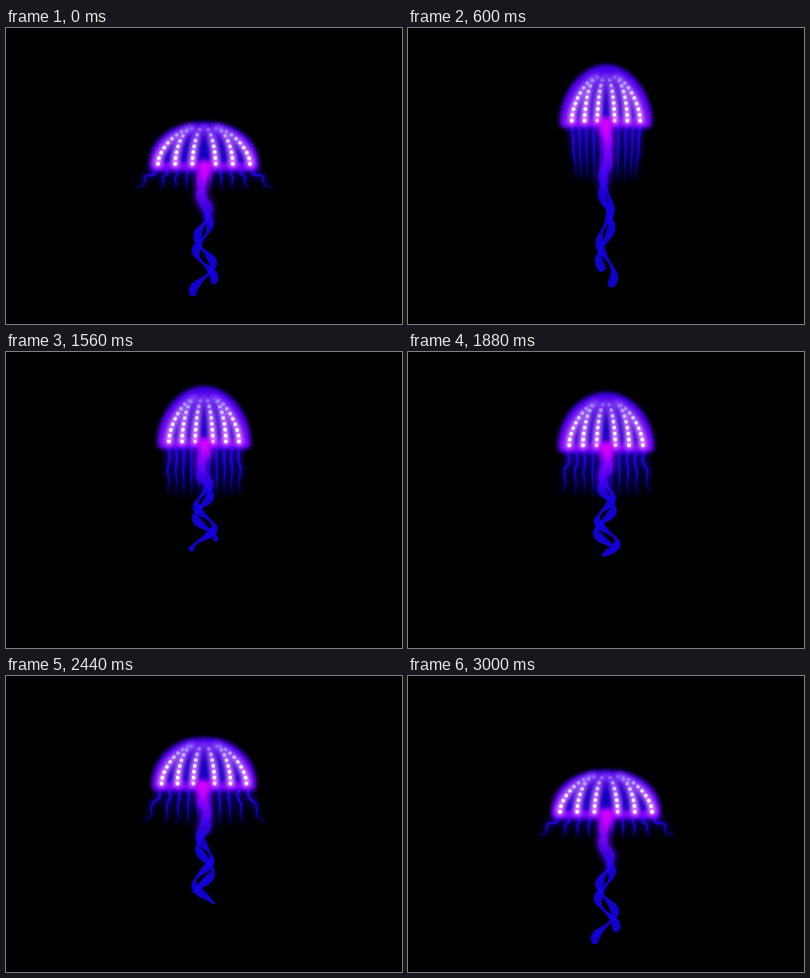
An HTML page with a canvas that plays this animation: 800 by 600 pixels, repeating every 3.04 s.

```html
<!DOCTYPE html>
<html>
<head>
<meta charset="utf-8">
<title>Jellyfish</title>
<style>
html, body { margin: 0; width: 100%; height: 100%; overflow: hidden; background: #000; }
canvas { display: block; }
</style>
</head>
<body>
<canvas id="stage" width="800" height="600"></canvas>
<script>
const ctx = document.getElementById('stage').getContext('2d');
const LOOP = 3040, SWIM = 3000, STEP = 40, CX = 400;
const WAVE = 0.42;

// Pose values at the key times, joined by monotone cubics
const TIMES = [0, 320, 560, 960, 1150, 1560, 2200, 2680, 3000];
const TRACKS = {
  base:   [275.5, 226, 190, 178, 176, 181.5, 201, 241, 275.5],
  shut:   [0, .85, .97, 1, .99, .91, .54, .09, 0],
  tip:    [537, 525, 520, 461, 428, 399, 435, 492, 537],
  sway:   [1.05, .92, .8, .73, .85, 1.15, 1.14, .98, 1.05],
  spread: [45, 3, -9, -11, -9, 2, 26, 40, 45],
  drop:   [45, 105, 118, 115, 112, 106, 88, 65, 45],
  wiggle: [5, 3, 1, 0, .5, 2, 4, 3.5, 5],
  node:   [.86, .98, 1.07, 1.21, 1.27, 1.365, 1.56, 1.72, 1.91]
};

function slope(v, i) {
  if (i === 0 || i === v.length - 1) return 0;
  const a = (v[i] - v[i - 1]) / (TIMES[i] - TIMES[i - 1]);
  const b = (v[i + 1] - v[i]) / (TIMES[i + 1] - TIMES[i]);
  return a * b <= 0 ? 0 : 2 * a * b / (a + b);
}

function sample(v, t) {
  let i = 0;
  while (i < TIMES.length - 2 && t > TIMES[i + 1]) i++;
  const d = TIMES[i + 1] - TIMES[i], s = (t - TIMES[i]) / d;
  const s2 = s * s, s3 = s2 * s;
  return v[i] * (2 * s3 - 3 * s2 + 1) + v[i + 1] * (3 * s2 - 2 * s3)
    + d * (slope(v, i) * (s3 - 2 * s2 + s) + slope(v, i + 1) * (s3 - s2));
}

function poseAt(t) {
  const p = { t: t / 1000 };
  for (const name in TRACKS) p[name] = sample(TRACKS[name], t);
  p.half = 93 - 24.5 * p.shut;
  p.len = p.tip - p.base;
  return p;
}

const blur = r => { ctx.filter = r ? `blur(${r}px)` : 'none'; };

function fade(y0, y1, ...stops) {
  const g = ctx.createLinearGradient(0, y0, 0, y1);
  stops.forEach(([at, color]) => g.addColorStop(at, color));
  return g;
}

// Closed outline around a centre line with a half width per point
function ribbon(points, halfWidth) {
  const left = [], right = [], n = points.length - 1;
  points.forEach(([x, y], i) => {
    const a = points[Math.max(0, i - 1)], b = points[Math.min(n, i + 1)];
    const dx = b[0] - a[0], dy = b[1] - a[1], d = Math.hypot(dx, dy) || 1;
    const w = halfWidth(i / n);
    left.push([x - dy / d * w, y + dx / d * w]);
    right.push([x + dy / d * w, y - dx / d * w]);
  });
  const path = new Path2D();
  left.concat(right.reverse()).forEach(([x, y], i) => i ? path.lineTo(x, y) : path.moveTo(x, y));
  path.closePath();
  return path;
}

function tentacles(p) {
  const top = p.base + 4;
  const roots = [.14, .36, .58, .79, 1];
  const out = [0, .05, .12, .34, 1], inward = [0, .1, .25, .55, 1];
  const paths = [];
  for (const side of [-1, 1]) {
    roots.forEach((r, j) => {
      const dx = p.spread * (p.spread > 0 ? out : inward)[j];
      const dy = (p.drop + 6) * (1 - .022 * j), d = Math.hypot(dx, dy);
      const amp = p.wiggle * (.1 + .9 * (j / 4) ** 2);
      const points = [];
      for (let i = 0; i <= 40; i++) {
        const v = i / 40;
        const wave = amp * Math.sin(Math.PI * (4 * v - .6)) * Math.min(1, 4 * v, 5 * (1 - v));
        points.push([
          CX + side * (p.half * r + dx * Math.pow(v, 1.15) - wave * dy / d),
          top + dy * v + wave * dx / d
        ]);
      }
      paths.push(ribbon(points, v => 3.2 * (1 - v) + .4));
    });
  }
  const end = top + p.drop + 6;
  blur(7);
  ctx.fillStyle = ctx.strokeStyle = fade(top, end,
    [0, 'rgba(45,0,255,.7)'], [.5, 'rgba(20,0,255,.45)'], [1, 'rgba(0,0,255,.18)']);
  ctx.lineWidth = 4;
  paths.forEach(s => { ctx.fill(s); ctx.stroke(s); });
  blur(1);
  ctx.fillStyle = fade(top, end,
    [0, 'rgba(60,0,255,.7)'], [.6, 'rgba(38,0,255,.75)'], [1, 'rgba(20,0,235,.5)']);
  paths.forEach(s => ctx.fill(s));
}

function dome(p) {
  const w = 102 - 18 * p.shut, y = p.base + 6, top = p.base - 75 - 30.5 * p.shut;
  const h = y - top, cx = w * (.63 - .13 * p.shut), cy = y - h * (.61 - .07 * p.shut);
  const s = new Path2D();
  s.moveTo(CX - w, y);
  s.bezierCurveTo(CX - w, cy, CX - cx, top, CX, top);
  s.bezierCurveTo(CX + cx, top, CX + w, cy, CX + w, y);
  s.closePath();
  return { s, top, y };
}

function ribs(p) {
  const h = 72 + 17 * p.shut, list = [];
  for (const [r, bend, end] of [[1, .56, .27], [.625, .75, .4], [.25, .6, .2]]) {
    for (const side of [-1, 1]) {
      const w = side * p.half * r, s = new Path2D();
      s.moveTo(CX + w, p.base);
      s.bezierCurveTo(CX + w, p.base - h * .4, CX + w * bend, p.base - h, CX + w * end, p.base - h);
      list.push(s);
    }
  }
  return { list, top: p.base - h };
}

function bell(p) {
  const { s, top, y } = dome(p);
  ctx.lineJoin = 'round';
  blur(6);
  ctx.strokeStyle = 'rgba(35,0,255,.95)';
  ctx.lineWidth = 13;
  ctx.stroke(s);
  blur(2);
  ctx.fillStyle = fade(top, y, [0, '#5200e4'], [.25, '#3000cc'], [.45, '#0c00b8'], [.85, '#0e00c4'], [1, '#7000ec']);
  ctx.fill(s);

  ctx.save();
  ctx.lineCap = 'round';
  blur(5);
  ctx.strokeStyle = fade(top, y, [0, 'rgba(80,0,240,.9)'], [.5, 'rgba(112,0,252,.9)'], [1, 'rgba(140,5,255,.9)']);
  ctx.lineWidth = 14;
  ctx.stroke(s);

  const { list, top: ribTop } = ribs(p);
  const lines = (r, width, color) => {
    blur(r);
    ctx.lineWidth = width;
    ctx.strokeStyle = color;
    list.forEach(q => ctx.stroke(q));
  };
  lines(6, 17, fade(ribTop, p.base, [0, 'rgba(115,30,240,.5)'], [.4, 'rgba(165,60,250,.8)'], [1, 'rgba(200,60,255,.9)']));
  lines(4, 11, fade(ribTop, p.base, [0, 'rgba(150,90,255,.4)'], [.35, 'rgba(215,140,255,.75)'], [1, 'rgba(250,180,255,.9)']));
  ctx.setLineDash([0, 12]);
  lines(.5, 7.6, fade(ribTop - 2, p.base,
    [0, 'rgba(140,120,255,.4)'], [.15, 'rgba(165,175,255,.7)'],
    [.4, 'rgba(215,230,250,.9)'], [.75, '#f0fbff'], [1, '#fff']));
  ctx.restore();
}

function arms(p) {
  const cross = .41 + .28 * p.t, paths = [];
  for (const [shift, end] of [[.0525, .905], [-.0525, 1]]) {
    const node = p.node - (1 - end);
    const girth = u => 2.6 + 6 * Math.sin(Math.PI * (u - node) / (WAVE / 2)) ** 2;
    const points = [];
    for (let i = 0; i <= 120; i++) {
      const u = end * i / 120;
      const a = 2 * Math.PI * (u - cross - shift) / WAVE;
      points.push([CX + p.sway * (2 + 20 * u) * Math.cos(a), p.base + p.len * u]);
    }
    const s = ribbon(points, v => girth(v * end));
    const [x, y] = points[120], cap = new Path2D();
    cap.arc(x, y, girth(end), 0, 7);
    paths.push([s, cap]);
  }
  const y0 = p.base, y1 = p.base + p.len * .5;

  blur(8);
  const g = ctx.createRadialGradient(CX, y0 + 8, 0, CX, y0 + 8, 24);
  g.addColorStop(0, 'rgba(225,0,255,.8)');
  g.addColorStop(1, 'rgba(160,0,255,0)');
  ctx.fillStyle = g;
  ctx.fillRect(CX - 26, y0 - 6, 52, 40);

  blur(7);
  ctx.fillStyle = ctx.strokeStyle = fade(y0, y1,
    [0, 'rgba(220,0,255,.8)'], [.3, 'rgba(130,0,255,.8)'], [.7, 'rgba(60,0,255,.55)'], [1, 'rgba(20,0,255,0)']);
  ctx.lineWidth = 5;
  paths.forEach(([s]) => { ctx.fill(s); ctx.stroke(s); });

  blur(.5);
  ctx.fillStyle = fade(y0, y1,
    [0, 'rgba(235,0,255,.15)'], [.15, 'rgba(220,0,255,.55)'], [.35, 'rgba(140,0,255,.6)'],
    [.65, 'rgba(75,0,255,.65)'], [1, 'rgba(20,0,240,.85)']);
  for (const [s, cap] of paths) {
    ctx.fill(s);
    // keep the rounded end from doubling the translucent body
    ctx.save();
    const outside = new Path2D();
    outside.rect(0, 0, 800, 600);
    outside.addPath(s);
    ctx.clip(outside, 'evenodd');
    ctx.fill(cap);
    ctx.restore();
  }
}

function draw(ms) {
  const t = Math.min(SWIM, Math.floor((ms % LOOP) / STEP) * STEP);
  const p = poseAt(t);
  blur(0);
  ctx.fillStyle = '#000';
  ctx.fillRect(0, 0, 800, 600);
  tentacles(p);
  bell(p);
  arms(p);
}

let start = null, shown = -1;
function tick() {
  const now = performance.now();
  if (start === null) start = now;
  const step = Math.floor((now - start) / STEP);
  if (step !== shown) {
    shown = step;
    draw(now - start);
  }
  requestAnimationFrame(tick);
}
tick();
</script>
</body>
</html>
```
